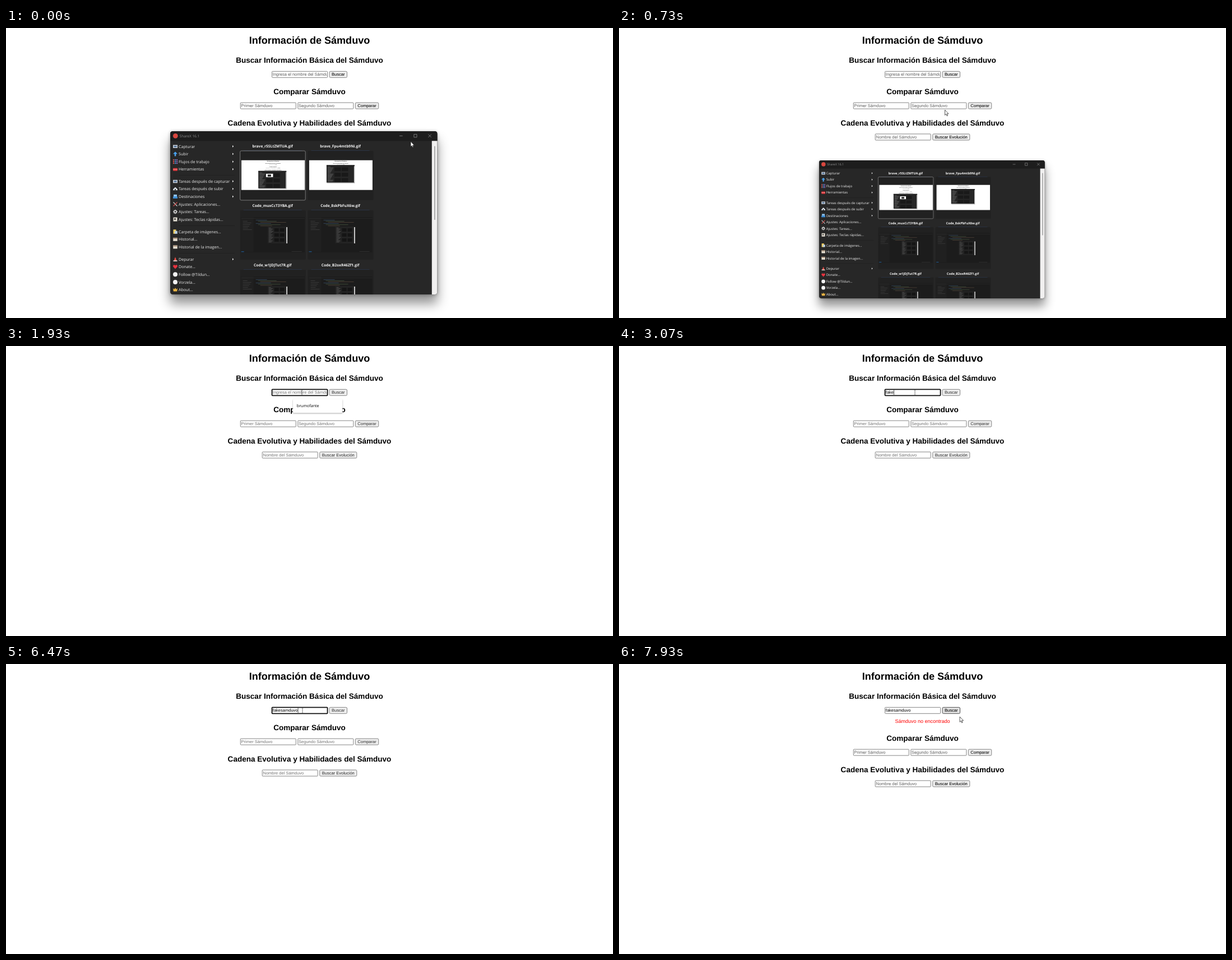
An HTML page for the animation above (8 s loop, 1083 px wide and 517 px high).

```html
<!DOCTYPE html>
<html lang="es">
<head>
<meta charset="utf-8">
<title>Información de Sámduvo</title>
<style>
  html, body { margin: 0; width: 100%; height: 100%; overflow: hidden; background: #fff; }
  #stage { display: block; width: 1083px; height: 517px; }
  text { font: 7.52px "Liberation Sans", Arial, sans-serif; text-rendering: geometricPrecision; }
  .h1 { font-size: 18.05px; font-weight: bold; text-anchor: middle; }
  .h2 { font-size: 13.54px; font-weight: bold; text-anchor: middle; }
  .box { fill: #fff; stroke: #767676; stroke-width: .9; }
  .focus { stroke: #101010; stroke-width: 1.8; }
  .hint { fill: #757575; stroke: #757575; stroke-width: .1; }
  .btn { fill: #efefef; stroke: #767676; stroke-width: .9; }
  .btn.hover { fill: #e2e2e2; stroke: #3a3a3a; }
  .label { stroke: #000; stroke-width: .06; text-anchor: middle; }
  .thin .hint { stroke: none; }
  .thin .label { fill: #2a2a2a; stroke: none; }
  #error { font-size: 9.03px; fill: #f00; text-anchor: middle; }
  #list text, #win text { font-family: "Open Sans", "Noto Sans", sans-serif; font-size: 7.1px; }
  #win text { fill: #ececec; }
  #win .name { font-size: 6.65px; font-weight: 700; text-anchor: middle; fill: #f4f4f4; }
  #win #title { font-size: 6.5px; fill: #8c8c8c; }
  #controls { fill: none; stroke: #8c8c8c; stroke-width: .8; }
  #win.active #title { fill: #fff; }
  #win.active #controls { stroke: #fff; }
  #base { fill: #272727; filter: drop-shadow(0 1px 3px rgba(0,0,0,.3)) drop-shadow(0 16px 10px rgba(0,0,0,.42)); }
  .active #base { filter: drop-shadow(0 1px 5px rgba(0,0,0,.45)) drop-shadow(0 17px 10px rgba(0,0,0,.62)); }
  #panel { filter: drop-shadow(.6px 1px 1px rgba(0,0,0,.35)); }
</style>
</head>
<body>
<svg id="stage" viewBox="0 0 1083 517">
  <defs>
    <clipPath id="frame"><rect width="476.5" height="291" rx="4.5"/></clipPath>
    <clipPath id="shot"><rect width="113.2" height="53.3"/></clipPath>
  </defs>
  <g id="page"></g>
  <text id="error" x="541.5" y="105.4">Sámduvo no encontrado</text>
  <text id="value" y="85.4" x="475.8"></text>
  <rect id="caret" y="78.4" width=".7" height="8.6"/>
  <g id="win"></g>
  <g id="list">
    <rect id="panel" x="512" y="95" width="88.3" height="24.3" rx="1" fill="#fff"/>
    <text x="518.8" y="109.4">brumofante</text>
  </g>
  <g id="cursor">
    <path id="arrow" d="M0 0V9.4L2.1 7.4L3.6 10.8L5 10.2L3.6 6.9H6.5Z" fill="#fff" stroke="#111" stroke-width=".7"/>
    <path id="beam" d="M-1.6-5H1.6M0-5V5M-1.6 5H1.6" stroke="#444" stroke-width=".7"/>
  </g>
</svg>
<script>
const $ = id => document.getElementById(id);
const show = (id, on) => $(id).setAttribute('visibility', on ? 'visible' : 'hidden');
const rect = (x, y, w, h, fill, more = '') =>
  `<rect x="${x}" y="${y}" width="${w}" height="${h}" fill="${fill}" ${more}/>`;
const text = (x, y, str, cls = '') => `<text x="${x}" y="${y}" class="${cls}">${str}</text>`;
const path = (d, stroke, w = 1, fill = 'none') =>
  `<path d="${d}" stroke="${stroke}" stroke-width="${w}" fill="${fill}"/>`;
const dot = (x, y, r, fill) => `<circle cx="${x}" cy="${y}" r="${r}" fill="${fill}"/>`;

// Web page
const input = (x, y, hint, id = '', hintId = '') =>
  `<rect ${id && `id="${id}"`} class="box" x="${x + .5}" y="${y + .5}" width="99" height="11" rx="1"/>
   <svg x="${x + 1.75}" y="${y}" width="96.6" height="12"><text class="hint" ${hintId && `id="${hintId}"`} y="8.6">${hint}</text></svg>`;
const button = (x, y, w, str, id = '') =>
  `<rect class="btn" ${id && `id="${id}"`} x="${x + .5}" y="${y + .5}" width="${w - 1}" height="11" rx="1.7"/>` +
  text(x + w / 2, y + 8.6, str, 'label');

$('page').innerHTML =
  text(541.5, 28.3, 'Información de Sámduvo', 'h1') +
  text(541.5, 62.2, 'Buscar Información Básica del Sámduvo', 'h2') +
  input(474.05, 76.8, 'Ingresa el nombre del Sámduvo', 'field', 'hint') +
  button(576.55, 76.8, 32.4, 'Buscar', 'search') +
  '<g id="lower">' +
  text(541.5, 118.1, 'Comparar Sámduvo', 'h2') +
  input(417.8, 132.6, 'Primer Sámduvo') +
  input(520.3, 132.6, 'Segundo Sámduvo') +
  button(622.8, 132.6, 42.4, 'Comparar') +
  text(541.5, 173.9, 'Cadena Evolutiva y Habilidades del Sámduvo', 'h2') +
  input(456.7, 188.4, 'Nombre del Sámduvo') +
  button(559.2, 188.4, 67.1, 'Buscar Evolución') +
  '</g>';

// Menu icons, centred on 0,0
const photo = rect(-4, -2.5, 8, 5.5, '#c9ced6') + rect(-2.5, -1, 5, 2.5, '#4c6f96');
const sheet = rect(-3.5, -3.5, 7, 7, '#e6e1d6') + rect(-2, -2, 3, 3, '#56534e');
const card = rect(-3.8, -3, 7.6, 6, '#e3ddd0') + rect(-3.8, -3, 7.6, 2, '#a98f78');
const grid = [0, 1, 2, 3, 4, 5, 6, 7, 8].map(i =>
  rect(i % 3 * 3 - 4, (i / 3 | 0) * 3 - 4, 2, 2, ['#e05252', '#4f9be0', '#9a6fd0'][i % 3])).join('');
const up = path('M0-4L4 0H1.3V4H-1.3V0H-4Z', 'none', 0, '#4aa3f0');
const toolbox = rect(-4, -2, 8, 5, '#d8343a', 'rx=".8"') + rect(-4, 0, 8, .8, '#f2b0a8');
const cloud = path('M-4 2.5Q-4-.5-2-1Q0-4.5 2.2-1Q4.5 0 4 2.5Z', 'none', 0, '#dfe6ee') + rect(-1, 0, 2, 2.5, '#333');
const drive = rect(-3, -3.5, 6, 4, '#8fc3ee') + rect(-4, 0, 8, 3.5, '#3f8fd6');
const tools = path('M-3.5-3.5L3.5 3.5', '#c9c9c9', 1.3) + path('M3.5-3.5L-3.5 3.5', '#cf4b4b', 1.3);
const gear = `<circle r="2.2" fill="none" stroke="#ddd" stroke-width="1.5"/>` +
  path('M0-4V-2M0 2V4M-4 0H-2M2 0H4M-2.8-2.8L-1.5-1.5M1.5 1.5L2.8 2.8M2.8-2.8L1.5-1.5M-1.5 1.5L-2.8 2.8', '#ddd', 1);
const folder = rect(-3.5, -4, 5, 7.5, '#f0cf62') + rect(-1, -1.5, 4.8, 5, '#b9cfe2');
const cone = path('M0-4L2.5 2.5H-2.5Z', 'none', 0, '#e8524a') + rect(-3.5, 2.2, 7, 1.6, '#e9e1dc');
const heart = path('M0 3.8L-3.8-.3Q-4.2-3.4-1.8-3.4Q-.3-3.3 0-1.9Q.3-3.3 1.8-3.4Q4.2-3.4 3.8-.3Z', 'none', 0, '#e8333f');
const disc = dot(0, 0, 4, '#f2f2f2');
const crown = path('M-4-2.5L-1.8-.5L0-3.5L1.8-.5L4-2.5L3.2 3H-3.2Z', 'none', 0, '#eab544');

// y of each block's first entry, then [icon, label, has submenu]
const menu = [
  [27, [photo, 'Capturar', 1], [up, 'Subir', 1], [grid, 'Flujos de trabajo', 1], [toolbox, 'Herramientas', 1]],
  [89.3, [photo, 'Tareas después de capturar', 1], [cloud, 'Tareas después de subir', 1], [drive, 'Destinaciones', 1],
    [tools, 'Ajustes: Aplicaciones...'], [gear, 'Ajustes: Tareas...'], [sheet, 'Ajustes: Teclas rápidas...']],
  [179.3, [folder, 'Carpeta de imágenes...'], [card, 'Historial...'], [card, 'Historial de la imagen...']],
  [228.2, [cone, 'Depurar', 1], [heart, 'Donate...'], [disc, 'Follow @Tildun...'], [disc, 'Vorzela...'], [crown, 'About...']]
];
const menuItems = menu.map(([top, ...items], b) =>
  (b ? rect(15, top - 11, 100, .7, '#1e1e1e') : '') +
  items.map(([icon, label, sub], i) => {
    const y = top + i * 13.57;
    return `<g transform="translate(9 ${y})">${icon}</g>` + text(15, y + 2.6, label) +
      (sub ? path(`M111 ${y - 2}L113.2 ${y}L111 ${y + 2}Z`, 'none', 0, '#eee') : '');
  }).join('')).join('');

// Thumbnails
const miniWin = (x, y, w, h) => {
  let s = rect(x + .5, y + 1.5, w, h, '#0003') + rect(x, y, w, h, '#262626') + rect(x, y, w, 1.8, '#1d1d1d');
  for (let i = 0; i < 15; i++) s += rect(x + 2, y + 3 + i * (h - 4) / 15, 5 + i * 5 % 6, .6, '#777');
  for (let i = 0; i < 6; i++)
    s += rect(x + w * (.28 + i % 2 * .26), y + 4 + (i >> 1) * h * .31, w * .23, h * .22, '#191919');
  return s + rect(x + w - 1, y + 1.8, 1, h - 1.8, '#ddd');
};
const webShot = (x, y, wx, wy) => `<g transform="translate(${x} ${y})" clip-path="url(#shot)">
  ${rect(0, 0, 114, 54, '#fff')}<use href="#page" transform="scale(.1045)"/>${miniWin(wx, wy, 50, 31)}`;
const codeShot = (x, y) => {
  let s = rect(x + 2, y + 12, 113, 63, '#1c1c1c') + rect(x + 2, y + 12, 22, 62, '#202020') +
    rect(x + 2, y + 14, 113, .6, '#303030') + rect(x + 2, y + 73.3, 5, 1, '#1e65a8') + rect(x + 92, y + 73.3, 18, .7, '#3a3a3a');
  for (let i = 0; i < 6; i++) {
    s += rect(x + 5, y + 19 + i * 3, 8 + i * 7 % 9, .7, '#444');
    s += rect(x + 28 + i % 3 * 4, y + 17 + i * 2.1, 20 + i * 13 % 32, .7, ['#39516a', '#4a5a42', '#5b4a3d'][i % 3]);
  }
  s += rect(x + 49, y + 29, 36, 30, '#232323') + rect(x + 82.6, y + 30, 1.6, 29, '#eee');
  for (let i = 0; i < 6; i++) s += rect(x + 61 + i % 2 * 10, y + 32 + (i >> 1) * 9, 8, 6, '#151515');
  for (let i = 0; i < 13; i++) s += rect(x + 51, y + 31 + i * 2.1, 4 + i * 3 % 5, .6, '#6a6a6a');
  return s;
};
const names = ['brave_r5SLtZMTUA.gif', 'brave_Fpu4mtb9Ni.gif', 'Code_muxCcT3YBA.gif',
  'Code_8skPbFuX6w.gif', 'Code_w1JDJTut7R.gif', 'Code_B2oxR46Zf1.gif'];
const thumbs = names.map((name, i) => {
  const x = 124.7 + i % 2 * 120.8, y = 35 + (i >> 1) * 106;
  return text(x + 58, y - 5.6, name, 'name') + rect(x, y, 117, 88, '#212121', 'rx="1.5"') +
    rect(x + 6, y - .8, 104, .7, '#2b3850') +
    (i > 1 ? codeShot(x, y) : webShot(x + 2.2, y + 16.5, i ? 31.2 : 30.3, i ? 9 : 19.3) +
      (i ? '' : rect(44, 24.3, 12.5, 6, '#fff') + rect(47, 25.8, 6, 3.5, '#222')) + '</g>');
}).join('');

$('win').innerHTML = `<rect id="base" width="476.5" height="291" rx="4.5"/><g clip-path="url(#frame)">` +
  rect(0, 0, 477, 17.3, '#1d1d1d') + rect(399, 0, 25, 17.3, '#2e2e2e', 'id="hover"') +
  dot(9.3, 8.3, 4.4, '#d8473f') + '<text id="title" x="16.6" y="10.8">ShareX 16.1</text>' +
  '<path id="controls" d="M409 8.3H414.6M434.8 5.6H440V10.8H434.8ZM460.4 5.6L465.8 11M465.8 5.6L460.4 11"/>' +
  menuItems + thumbs + rect(124.7, 35, 116.5, 88, 'none', 'rx="2" stroke="#8e8e8e" stroke-width=".8"') +
  rect(466.8, 17.3, 10, 274, '#f1f0f0') + rect(471.3, 26.5, 1.3, 131.5, '#858585', 'rx=".6"') + '</g>';

// Motion, counted in ticks of 1/15 s; keys are [tick, ...values]
const TICKS = 120;
const pointer = [[1, 722, 202.3], [3, 718, 201], [5, 711, 197], [7, 706, 195], [9, 705, 195], [10, 655, 178],
  [11, 581.5, 146], [12, 566, 124], [13, 555, 106], [14, 546, 95], [15, 538, 89], [16, 532, 85], [18, 528, 83],
  [96, 528, 83], [97, 529, 83], [98, 533, 83], [99, 542, 83], [100, 556, 84], [101, 575, 86], [102, 592, 87],
  [103, 605, 88], [104, 611, 88], [106, 608, 87], [108, 605, 86], [118, 605, 86], [119, 608, 94]];
// x, y, scale, opacity
const minimise = [[9, 293, 184, 1, 1], [10, 307, 195, .96, 1], [11, 357, 236, .845, 1],
  [12, 408.5, 284, .7, .6], [13, 443, 316, .6, .2], [14, 460, 330, .55, 0]];
const suggest = [[20, 0], [21, .5], [22, 1], [34, 1], [36, 0]];
const word = 'fakesamduvo';
const strokes = [34, 38, 42, 46, 57, 60, 63, 66, 74, 87, 91];
const caretOff = [[29, 34], [55, 57], [83, 87], [100, 108]];

const within = (k, a, b) => k >= a && k < b;
function at(keys, k) {
  if (k <= keys[0][0]) return keys[0].slice(1);
  const i = keys.findIndex(key => key[0] >= k);
  if (i < 0) return keys[keys.length - 1].slice(1);
  const a = keys[i - 1], b = keys[i], p = (k - a[0]) / (b[0] - a[0]);
  return a.slice(1).map((v, j) => v + (b[j + 1] - v) * p);
}

let last = -1;
function draw(k) {
  const [wx, wy, scale, alpha] = at(minimise, k);
  $('win').setAttribute('transform', `translate(${wx} ${wy}) scale(${scale})`);
  $('win').setAttribute('opacity', alpha);
  $('win').setAttribute('class', within(k, 8, 11) ? 'active' : '');
  show('win', k < 14);
  $('hover').setAttribute('opacity', within(k, 6, 11) ? 1 : 0);

  const typed = strokes.filter(s => s <= k).length;
  $('value').textContent = word.slice(0, typed);
  show('hint', !typed);
  $('caret').setAttribute('x', 476 + (typed ? $('value').getComputedTextLength() : 0));
  show('caret', within(k, 21, 110) && !caretOff.some(([a, b]) => within(k, a, b)));
  $('field').classList.toggle('focus', within(k, 18, 110));
  $('search').classList.toggle('hover', k >= 102);
  $('page').setAttribute('class', within(k, 21, 110) ? 'thin' : '');
  $('list').setAttribute('opacity', at(suggest, k)[0]);

  show('error', k >= 112);
  $('lower').setAttribute('transform', `translate(0 ${k >= 112 ? 19 : 0})`);

  const [x, y] = at(pointer, k);
  const overField = x > 474 && x < 574 && y > 76 && y < 89;
  $('cursor').setAttribute('transform', `translate(${x} ${y})`);
  show('arrow', !overField);
  show('beam', overField);
}

const start = performance.now();
function loop() {
  const t = Math.max(0, performance.now() - start) % 8000;
  const k = Math.floor((t + 5) * .015) % TICKS;
  if (k !== last) draw(last = k);
  requestAnimationFrame(loop);
}
loop();
</script>
</body>
</html>
```
